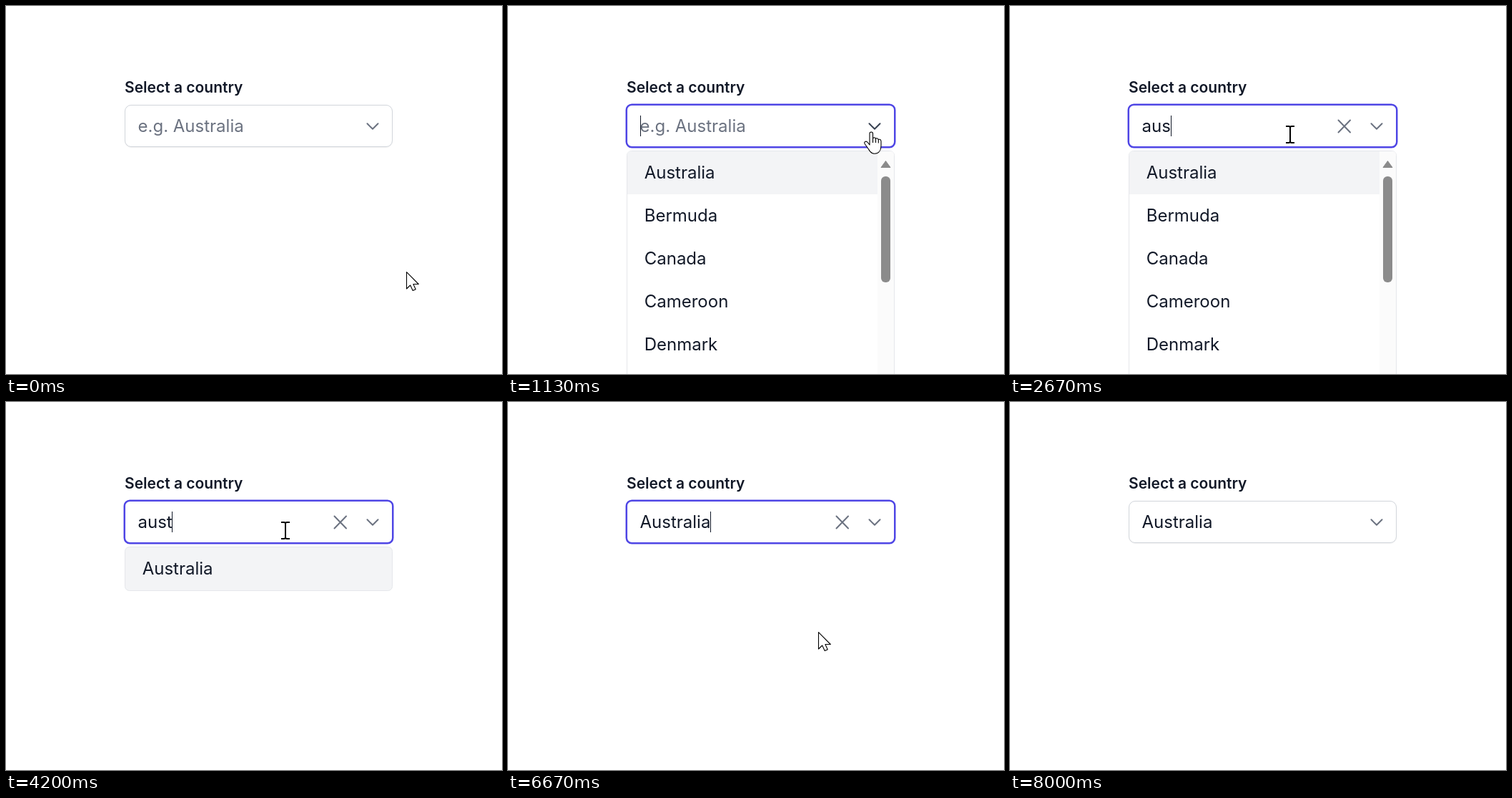
An HTML page for the animation above (9.47 s loop, 694x514 px).

```html
<!DOCTYPE html>
<html lang="en">
<head>
<meta charset="utf-8">
<title>Country picker</title>
<style>
  html, body { margin: 0; width: 100%; height: 100%; overflow: hidden; background: #fff; }
  svg { display: block; }
  text { font: 24px Inter, sans-serif; fill: #111827; }
  .label { font-size: 21px; font-weight: 600; }
  .icon { fill: none; stroke: #6b7280; stroke-width: 2; stroke-linecap: round; stroke-linejoin: round; }
  .cursor { fill: #fff; stroke: #000; stroke-width: 1.1; stroke-linejoin: round; }
</style>
</head>
<body>
<svg width="694" height="514" viewBox="0 0 694 514">
  <text class="label" x="166" y="121">Select a country</text>

  <g id="idle">
    <rect x="166.5" y="139.5" width="374" height="58" rx="8.5" fill="none" stroke="#000" stroke-opacity=".05"/>
    <rect x="166.5" y="138.5" width="374" height="58" rx="8.5" fill="#fff" stroke="#d1d5db"/>
  </g>
  <rect id="focus" x="165.75" y="137.75" width="375.5" height="59.5" rx="7.5" fill="#fff" stroke="#4f46e5" stroke-width="2.5"/>

  <text id="value" x="184.5" y="176"></text>
  <rect id="caret" y="153" width="1" height="29" fill="#111827"/>
  <path id="clear" class="icon" d="M459.5 159.5l16.5 17M476 159.5l-16.5 17"/>
  <path id="chevron" class="icon" d="M505.5 164.3l7.5 7.5 7.5-7.5"/>

  <g id="fullList">
    <rect x="166.5" y="202.5" width="374" height="340" rx="6" fill="#fff" stroke="#e5e7eb"/>
    <path d="M517 203H535Q540 203 540 208V514H517Z" fill="#fbfbfb"/>
    <path d="M167 263V208Q167 203 172 203H517V263Z" fill="#f3f4f6"/>
    <path d="M522 225.5L528.5 216.5 535 225.5Z" fill="#8b8b8b" stroke="#8b8b8b" stroke-linejoin="round"/>
    <rect x="522" y="238" width="13" height="148" rx="6" fill="#8b8b8b"/>
  </g>
  <rect id="shortList" x="166.5" y="202.5" width="374" height="61" rx="6" fill="#f3f4f6" stroke="#e5e7eb"/>
  <g id="options"></g>

  <path id="arrow" class="cursor" d="M.5.7V24L5.7 19 9.2 26.5 13.2 24.7 9.9 17.5H17.3Z"/>
  <g id="hand" class="cursor">
    <path transform="translate(-10 -1)" d="M8 19V3.2C8 .2 12.5.2 12.5 3.2V11C12.5 8 16.5 8 16.5 11.2 16.5 9 20.3 9.3 20.3 12.4 20.3 10.5 24 10.7 24 14V20C24 27 20.5 31.2 15 31.2 10 31.2 8 28 6.5 25L1.2 17.5C-.5 14.8 3 12.8 5.2 15.5ZM12.5 11V16M16.5 11.2V16M20.3 12.4V16.5"/>
  </g>
  <path id="beam" d="M-6-11.5h4q2 0 2 2v19q0 2-2 2h-4M6-11.5H2q-2 0-2 2M0 9.5q0 2 2 2h4" fill="none" stroke="#000" stroke-width="2"/>
</svg>
<script>
const LOOP = 9470, FPS = 15;
const el = id => document.getElementById(id);
const show = (id, on) => { el(id).style.display = on ? '' : 'none'; };

['Australia', 'Bermuda', 'Canada', 'Cameroon', 'Denmark'].forEach((name, i) => {
  const option = document.createElementNS('http://www.w3.org/2000/svg', 'text');
  option.setAttribute('x', 190.7);
  option.setAttribute('y', 241 + 60 * i);
  option.textContent = name;
  el('options').append(option);
});
const others = [...el('options').children].slice(1);

// All steps are counted in ticks of 1/15 s.
const OPEN = 16, FILTER = 47, PICK = 93, BLUR = 106, BLINK = 8;

// tick, field text, caret x
const edits = [
  [0, '', 185], [OPEN, '', 185], [34, 'a', 198], [37, 'au', 212],
  [40, 'aus', 225], [63, 'aust', 232], [PICK, 'Australia', 283]
];

const linear = p => p;
const smooth = p => p * p * (3 - 2 * p);
const easeOut = p => p * (2 - p);
const easeIn = p => p ** 1.5;

// start tick, end tick, target x, target y, easing
const moves = [
  [0, 5, 517, 243, smooth],
  [8, 13, 513, 176, smooth],
  [16, 24, 392, 179.5, smooth],
  [53, 54, 391, 179.5, linear],
  [81, 88, 352, 242, smooth],
  [96, 100, 434, 321, linear],
  [100, 104, 491, 357, easeOut],
  [111, 120, 343, 528, easeIn]
];

function pointerAt(tick) {
  let x = 560, y = 371;
  for (const [start, end, toX, toY, ease] of moves) {
    if (tick <= start) break;
    const p = ease(Math.min(1, (tick - start) / (end - start)));
    x += (toX - x) * p;
    y += (toY - y) * p;
  }
  return [Math.round(x), y === 179.5 ? y : Math.round(y)];
}

function render(time) {
  const tick = Math.floor((time + 4) * FPS / 1000);
  const [since, text, caretX] = edits.findLast(edit => edit[0] <= tick);
  const focused = tick >= OPEN && tick < BLUR;
  const open = tick >= OPEN && tick < PICK;
  const filtered = tick >= FILTER;

  const value = el('value');
  value.textContent = text || 'e.g. Australia';
  value.style.fill = text ? '' : '#6b7280';
  el('caret').setAttribute('x', caretX);
  show('caret', focused && (tick - since) % (2 * BLINK) < BLINK);
  show('idle', !focused);
  show('focus', focused);
  show('clear', focused && text);
  show('fullList', open && !filtered);
  show('shortList', open && filtered);
  show('options', open);
  others.forEach(option => { option.style.display = filtered ? 'none' : ''; });

  const [x, y] = pointerAt(tick);
  const overField = x >= 166 && x < 541 && y >= 138 && y < 197;
  const overButton = overField && x >= 491;
  const overList = open && x >= 166 && x < 541 && y >= 203;
  const kind = overButton || overList ? 'hand' : overField ? 'beam' : 'arrow';
  for (const id of ['arrow', 'hand', 'beam']) show(id, id === kind);
  el(kind).setAttribute('transform', `translate(${x} ${y})`);
  el('chevron').style.stroke = overButton ? '#374151' : '';
}

const begin = performance.now();
function loop() {
  render((performance.now() - begin) % LOOP);
  requestAnimationFrame(loop);
}
loop();
</script>
</body>
</html>
```
